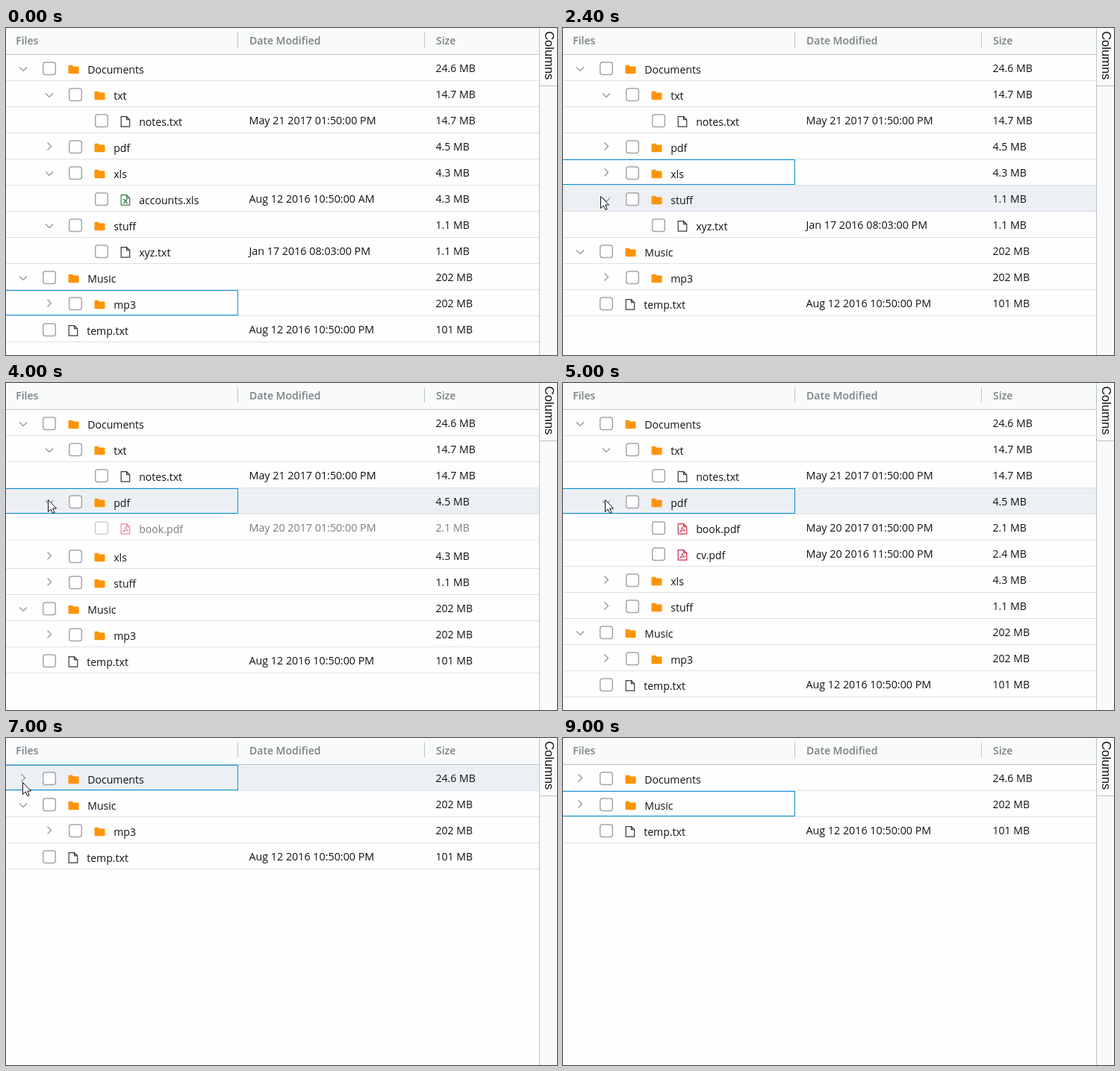
An HTML page with a canvas for the animation above (9200 ms loop, 738 by 438 pixels).

```html
<!DOCTYPE html>
<html lang="en">
<head>
<meta charset="utf-8">
<title>File tree</title>
<style>
  html, body { margin: 0; width: 100%; height: 100%; overflow: hidden; background: #fefefe; }
  canvas { display: block; }
</style>
</head>
<body>
<canvas id="stage" width="738" height="438"></canvas>
<script>
const ctx = document.getElementById('stage').getContext('2d');
const LOOP = 9200, STEP = 200, SLIDE = 400;
const HEADER = 36, ROW = 35, GRID = 714, NAME_COL = 311;
const INK = '#101314', LINE = '#bdc3c7';
const BODY = '14.1px "Open Sans", sans-serif';
const DATE = '14.3px "Open Sans", sans-serif';
const HEAD = '600 14px "Open Sans", sans-serif';

// name, depth, icon, size, date
const rows = [
  ['Documents', 0, 'folder', '24.6 MB'],
  ['txt', 1, 'folder', '14.7 MB'],
  ['notes.txt', 2, 'txt', '14.7 MB', 'May 21 2017 01:50:00 PM'],
  ['pdf', 1, 'folder', '4.5 MB'],
  ['book.pdf', 2, 'pdf', '2.1 MB', 'May 20 2017 01:50:00 PM'],
  ['cv.pdf', 2, 'pdf', '2.4 MB', 'May 20 2016 11:50:00 PM'],
  ['xls', 1, 'folder', '4.3 MB'],
  ['accounts.xls', 2, 'xls', '4.3 MB', 'Aug 12 2016 10:50:00 AM'],
  ['stuff', 1, 'folder', '1.1 MB'],
  ['xyz.txt', 2, 'txt', '1.1 MB', 'Jan 17 2016 08:03:00 PM'],
  ['Music', 0, 'folder', '202 MB'],
  ['mp3', 1, 'folder', '202 MB'],
  ['temp.txt', 0, 'txt', '101 MB', 'Aug 12 2016 10:50:00 PM']
].map(([name, depth, icon, size, date = '']) => ({ name, depth, icon, size, date }));

const clicks = [[1730, 'xls'], [2640, 'stuff'], [3870, 'pdf'], [6250, 'Documents'], [7350, 'Music']];

// time, x, y of the pointer tip
const pointerPath = [
  [600, 95, 392], [1200, 61, 192], [1750, 61, 192], [2200, 51, 225], [2400, 51, 225],
  [2600, 51, 229], [3200, 51, 229], [3750, 57, 156], [5600, 57, 156], [6200, 23, 59],
  [7000, 23, 59], [7300, 23, 90], [7500, 23, 90], [7800, 30, 171], [7999, 30, 171]
];

function pointerAt(t) {
  const next = pointerPath.findIndex(key => key[0] > t);
  if (next < 1) return null;
  const [t0, x0, y0] = pointerPath[next - 1], [t1, x1, y1] = pointerPath[next];
  const p = (t - t0) / (t1 - t0), k = p * p * (3 - 2 * p);
  return { x: Math.round(x0 + (x1 - x0) * k), y: Math.round(y0 + (y1 - y0) * k) };
}

// Top of every visible row, by name
function layout(closed) {
  const tops = new Map();
  let hiddenBelow = Infinity, top = HEADER;
  for (const row of rows) {
    if (row.depth > hiddenBelow) continue;
    hiddenBelow = closed.has(row.name) ? row.depth : Infinity;
    tops.set(row.name, top);
    top += ROW;
  }
  return tops;
}

function treeAt(t) {
  const closed = new Set(['pdf', 'mp3']);
  let focus = 'mp3', before = layout(closed), progress = 1;
  for (const [time, name] of clicks) {
    if (t < time) break;
    before = layout(closed);
    if (!closed.delete(name)) closed.add(name);
    focus = name;
    const p = Math.min(1, (t - time) / SLIDE);
    progress = 1 - (1 - p) ** 2;
  }
  const after = layout(closed), placed = [];
  for (const row of rows) {
    const from = before.get(row.name), to = after.get(row.name);
    const moving = from !== undefined && to !== undefined;
    const alpha = moving ? 1 : to !== undefined ? progress : from !== undefined ? 1 - progress : 0;
    if (alpha > 0) {
      const top = moving ? Math.round(from + (to - from) * progress) : to ?? from;
      placed.push({ row, top, alpha });
    }
  }
  placed.sort((a, b) => a.alpha - b.alpha);
  return { placed, closed, focus };
}

function fill(color, x, y, w, h) {
  ctx.fillStyle = color;
  ctx.fillRect(x, y, w, h);
}

function text(str, x, y, color = INK, font = BODY) {
  ctx.font = font;
  ctx.fillStyle = color;
  ctx.fillText(str, x, y);
}

function stroke(path, color, width, x, y) {
  ctx.save();
  ctx.translate(x, y);
  ctx.strokeStyle = color;
  ctx.lineWidth = width;
  ctx.stroke(new Path2D(path));
  ctx.restore();
}

function drawIcon(kind, x, y) {
  if (kind === 'folder') {
    ctx.save();
    ctx.translate(x + .5, y + 13.7);
    ctx.fillStyle = '#ff9408';
    ctx.fill(new Path2D('M1.3 0H5.2L6.8 1.7H12.7Q14 1.7 14 3V10.2Q14 11.5 12.7 11.5H1.3Q0 11.5 0 10.2V1.3Q0 0 1.3 0Z'));
    ctx.restore();
    return;
  }
  const color = { txt: '#343b40', pdf: '#d5304f', xls: '#3b7f4c' }[kind];
  stroke('M1.2 .6H8.5L12.7 4.7V14.2H1.2ZM8.5 .6V4.7H12.7', color, 1.2, x, y + 12);
  if (kind === 'xls') stroke('M4.5 6L9.5 12M9.5 6L4.5 12', color, 1.4, x, y + 12);
  if (kind === 'pdf') stroke('M3.5 11.5Q7 9 6.5 5Q7.5 9 11 9.8Q7 9 3.5 11.5', color, 1, x, y + 12);
}

function drawRow({ row, top, alpha }, tree, hovered) {
  const x = row.depth * ROW, isFolder = row.icon === 'folder';
  ctx.globalAlpha = alpha;
  fill(hovered ? '#ecf0f4' : '#fefefe', 0, top, GRID, ROW);
  fill('#dce1e5', 0, top + ROW - 1, GRID, 1);
  if (isFolder) {
    const chevron = tree.closed.has(row.name) ? 'M-2.5 -5.5L2.5 -.5L-2.5 4.5' : 'M-5 -1.5L0 3.5L5 -1.5';
    stroke(chevron, '#8d9294', 1.2, x + 23, top + 18);
  }
  ctx.strokeStyle = '#a4a7a9';
  ctx.lineWidth = 1.5;
  ctx.beginPath();
  ctx.roundRect(x + 49.7, top + 10, 16.6, 16.6, 3);
  ctx.fillStyle = '#fff';
  ctx.fill();
  ctx.stroke();
  drawIcon(row.icon, x + 83, top);
  text(row.name, x + (isFolder ? 109.2 : 108.2), top + 25);
  text(row.date, 325.5, top + 23, INK, DATE);
  text(row.size, 575.5, top + 23);
  if (tree.focus === row.name) {
    ctx.strokeStyle = '#0a93dc';
    ctx.lineWidth = 1;
    ctx.strokeRect(-1.5, top + .5, NAME_COL + 1, ROW - 2);
  }
  ctx.globalAlpha = 1;
}

function drawHeader() {
  fill('#f8fafb', 0, 0, GRID, HEADER - 1);
  fill(LINE, 0, HEADER - 1, GRID, 1);
  for (const x of [310, 560]) fill(LINE, x, 6, 1, 20);
  for (const [label, x] of [['Files', 13.2], ['Date Modified', 326], ['Size', 576]]) {
    text(label, x, 22, '#7c8184', HEAD);
  }
}

function drawSidebar() {
  fill('#f9fafb', GRID, 0, 24, 438);
  fill(LINE, GRID, 0, 1, 438);
  fill(LINE, GRID, 77, 24, 1);
  ctx.save();
  ctx.translate(721.7, 4.2);
  ctx.rotate(Math.PI / 2);
  text('Columns', 0, 0, INK, '16.5px "Liberation Sans", Arial, sans-serif');
  ctx.restore();
}

function drawPointer({ x, y }) {
  ctx.save();
  ctx.translate(x - .5, y + .5);
  const arrow = new Path2D('M0 0V16L3.7 12.5L6.2 18L8.6 17L6.2 11.5H11Z');
  ctx.fillStyle = '#fff';
  ctx.fill(arrow);
  ctx.strokeStyle = '#111';
  ctx.lineWidth = 1;
  ctx.stroke(arrow);
  ctx.restore();
}

function draw(now) {
  const t = Math.floor(now % LOOP / STEP) * STEP;
  const tree = treeAt(t), pointer = pointerAt(t);
  fill('#fefefe', 0, 0, 738, 438);
  for (const item of tree.placed) {
    const hovered = pointer && pointer.y >= item.top && pointer.y < item.top + ROW;
    drawRow(item, tree, hovered);
  }
  drawHeader();
  drawSidebar();
  if (pointer) drawPointer(pointer);
}

const start = performance.now();
function frame() {
  draw(performance.now() - start);
  requestAnimationFrame(frame);
}
frame();
</script>
</body>
</html>
```
